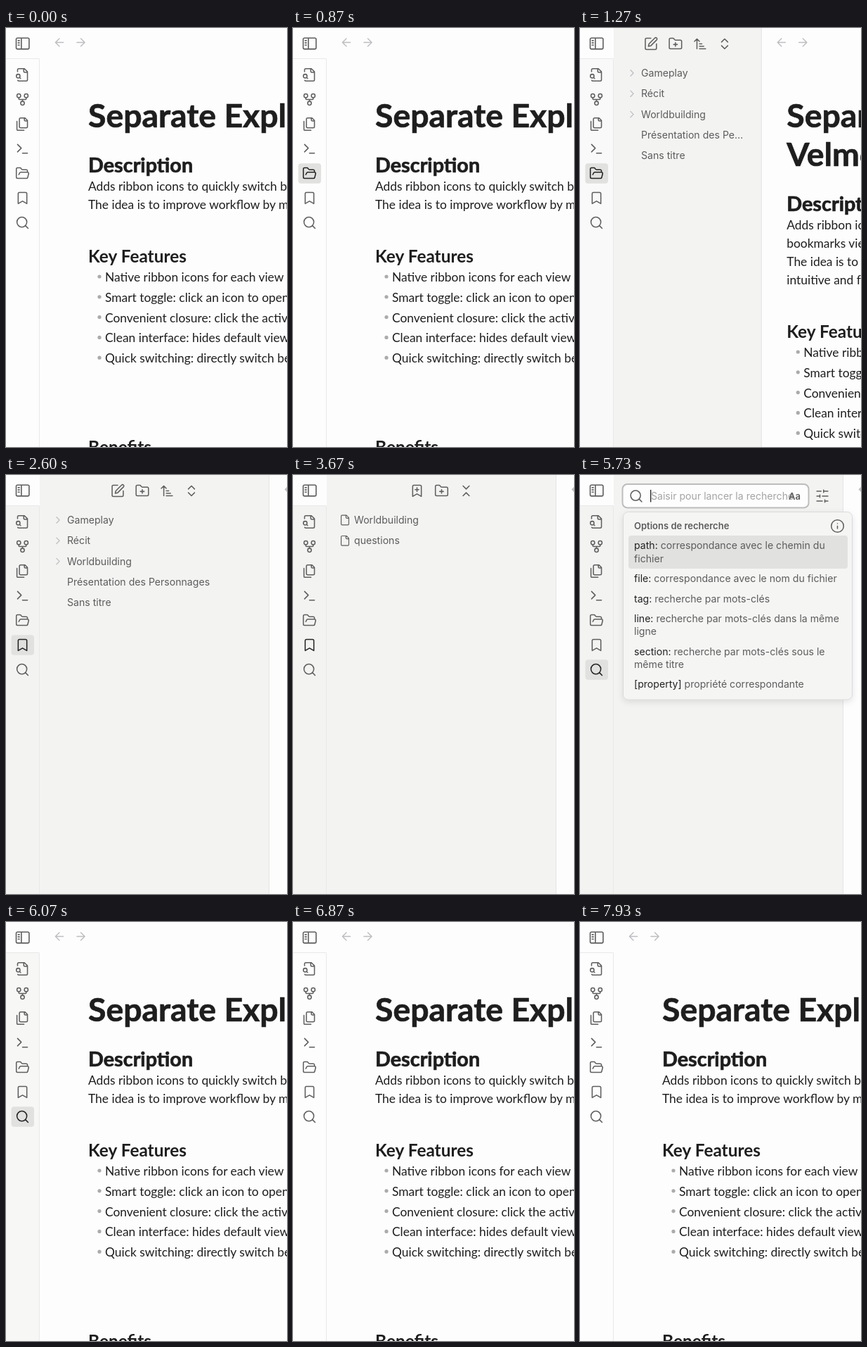
An HTML page that plays this animation: 400x595 px, repeating every 8 s.

```html
<!DOCTYPE html>
<html lang="fr">
<head>
<meta charset="utf-8">
<title>Sidebar ribbon</title>
<style>
  html, body { margin: 0; width: 100%; height: 100%; overflow: hidden; background: #fdfdfd; }
  svg { display: block; width: 100vw; height: 100vh; }
  text { white-space: pre; }
  .doc { font-family: Lato, sans-serif; fill: #1e1e1e; }
  .ui { font-family: Inter, sans-serif; font-size: 14.1px; fill: #5c5c5c; }
  .key { fill: #222; }
  .bold { font-weight: 700; }
  .heavy { stroke: #1e1e1e; stroke-width: 0.7; }
  .semi { font-weight: 600; font-size: 13px; }
  .icon { fill: none; stroke: #5f5f5f; stroke-width: 1.75; stroke-linecap: round; stroke-linejoin: round; }
  .faint { stroke: #bebec2; }
</style>
</head>
<body>
<svg id="stage" viewBox="0 0 400 595"></svg>
<script>
const LOOP = 8000, STEP = 1000 / 15;
const RIBBON = 48, OPEN = 375;
const PAGE = '#fdfdfd', PANEL = '#f3f3f2', ACTIVE = '#e1e1e0', LINE = '#e4e4e4';

const circle = (x, y, r) => `M${x - r} ${y}a${r} ${r} 0 1 0 ${2 * r} 0a${r} ${r} 0 1 0 ${-2 * r} 0`;
const bookmark = 'M19 21l-7-4-7 4V5a2 2 0 0 1 2-2h10a2 2 0 0 1 2 2z';
const icons = {
  sidebar: 'M4 3.5h16a2 2 0 0 1 2 2v13a2 2 0 0 1-2 2H4a2 2 0 0 1-2-2v-13a2 2 0 0 1 2-2zM10 3.5v17M5 7.5h2M5 11h2M5 14.5h2',
  fileSearch: 'M14 2v4a2 2 0 0 0 2 2h4M4.3 21a2 2 0 0 0 1.7 1H18a2 2 0 0 0 2-2V7l-5-5H6a2 2 0 0 0-2 2v3M9 18l-1.5-1.5' + circle(5, 14, 3),
  fork: circle(12, 18, 3) + circle(6, 6, 3) + circle(18, 6, 3) + 'M18 9v2q0 1-1 1H7q-1 0-1-1V9M12 12v3',
  files: 'M20 7h-3a2 2 0 0 1-2-2V2M9 18a2 2 0 0 1-2-2V4a2 2 0 0 1 2-2h7l4 4v10a2 2 0 0 1-2 2zM3 7.6v12.8A1.6 1.6 0 0 0 4.6 22h9.8',
  terminal: 'M4 17l6-6-6-6M12 19h8',
  folder: 'M6 14l1.5-2.9A2 2 0 0 1 9.2 10H20a2 2 0 0 1 1.9 2.5l-1.5 6a2 2 0 0 1-2 1.5H4a2 2 0 0 1-2-2V5a2 2 0 0 1 2-2h3.9a2 2 0 0 1 1.7.9l.8 1.2a2 2 0 0 0 1.7.9H18a2 2 0 0 1 2 2v2',
  bookmark,
  search: circle(11, 11, 8) + 'M21 21l-4.3-4.3',
  edit: 'M12 3H5a2 2 0 0 0-2 2v14a2 2 0 0 0 2 2h14a2 2 0 0 0 2-2v-7M18.4 2.6a2.1 2.1 0 0 1 3 3l-9.4 9.4-4 1 1-4z',
  folderPlus: 'M12 10v6M9 13h6M20 20a2 2 0 0 0 2-2V8a2 2 0 0 0-2-2h-7.9a2 2 0 0 1-1.7-.9l-.8-1.2A2 2 0 0 0 7.9 3H4a2 2 0 0 0-2 2v13a2 2 0 0 0 2 2z',
  sort: 'M3 8l4-4 4 4M7 4v16M11 12h4M11 16h7M11 20h10',
  expand: 'M7 15l5 5 5-5M7 9l5-5 5 5',
  collapse: 'M7 20l5-5 5 5M7 4l5 5 5-5',
  bookmarkPlus: bookmark + 'M12 7v6M15 10H9',
  file: 'M15 2H6a2 2 0 0 0-2 2v16a2 2 0 0 0 2 2h12a2 2 0 0 0 2-2V7zM14 2v4a2 2 0 0 0 2 2h4',
  chevron: 'M9 18l6-6-6-6',
  sliders: 'M21 4h-7M10 4H3M21 12h-9M8 12H3M21 20h-5M12 20H3M14 2v4M8 10v4M16 18v4',
  info: circle(12, 12, 10) + 'M12 16v-4M12 8h0',
  back: 'M12 19l-7-7 7-7M19 12H5',
  forward: 'M12 5l7 7-7 7M5 12h14'
};

const icon = (name, x, y, size = 0.88, cls = '') =>
  `<path class="icon ${cls}" d="${icons[name]}" transform="translate(${x} ${y}) scale(${size}) translate(-12 -12)"/>`;
const text = (x, y, s, cls = 'ui', size) =>
  `<text class="${cls}" x="${x}" y="${y}"${size ? ` style="font-size:${size}px"` : ''}>${s}</text>`;
const body = (y, s, x = 0) => text(x, y, s, 'doc', 17.4);
const heading = (y, s, size, cls = '') => text(0, y, s, 'doc bold ' + cls, size);
const title = (y, s) => heading(y, s, 46.4, 'heavy');
const section = y => heading(y, 'Description', 28.8, 'heavy');
const toolbar = names => names.map((n, i) => icon(n, (i - (names.length - 1) / 2) * 35, 22.5)).join('');
const rowY = i => 69 + i * 29.3;

const ribbonIcons = ['fileSearch', 'fork', 'files', 'terminal', 'folder', 'bookmark', 'search'];
const ribbonY = i => 66.5 + i * 35;

const features = [
  'Native ribbon icons for each view',
  'Smart toggle: click an icon to open it',
  'Convenient closure: click the active icon',
  'Clean interface: hides default view tabs',
  'Quick switching: directly switch between'
].map((s, i) => {
  const y = 360 + i * 28.8;
  return `<circle cx="16" cy="${y - 7}" r="2.6" fill="#ababab"/>` + body(y, s, 24);
}).join('');

// Same document, laid out for a wide or a narrow column.
const wideText = title(141, 'Separate Explorer for Velmorra') + section(205) +
  body(231, 'Adds ribbon icons to quickly switch between') +
  body(257, 'The idea is to improve workflow by making');
const narrowText = title(141, 'Separate Explorer for') + title(196, 'Velmorra') + section(260) +
  ['Adds ribbon icons to quickly switch', 'bookmarks views', 'The idea is to improve workflow', 'intuitive and faster']
    .map((s, i) => body(286 + i * 26, s)).join('');

const treeRows = ['Gameplay', 'Récit', 'Worldbuilding', 'Présentation des Personnages', 'Sans titre'];
const option = (y, key, s, more) =>
  text(77, y, `<tspan class="key">${key}</tspan> ${s}`) + (more ? text(77, y + 18.7, more) : '');

const stage = document.getElementById('stage');
stage.innerHTML = `
<defs>
  <clipPath id="panelClip"><rect id="clipRect" x="48" width="0" height="595"/></clipPath>
  <clipPath id="inputClip"><rect x="90" y="14" width="213" height="32"/></clipPath>
  <filter id="shadow" x="-10%" y="-10%" width="120%" height="125%">
    <feDropShadow dx="0" dy="3" stdDeviation="4" flood-color="#000" flood-opacity=".1"/>
  </filter>
</defs>
<rect width="400" height="595" fill="${PAGE}"/>
<g id="nav">${icon('back', 28, 20.5, 0.8, 'faint')}${icon('forward', 58.5, 20.5, 0.8, 'faint')}</g>
<g id="page">
  <g id="wide">${wideText}</g><g id="narrow">${narrowText}</g>
  <g id="rest">${heading(333, 'Key Features', 24.4)}${features}${heading(604, 'Benefits', 24.4)}</g>
</g>
<g clip-path="url(#panelClip)">
  <rect x="48" width="352" height="595" fill="${PANEL}"/>
  <g id="explorer">
    <g class="centred">${toolbar(['edit', 'folderPlus', 'sort', 'expand'])}</g>
    ${treeRows.map((s, i) => text(87, rowY(i), s) + (i < 3 ? icon('chevron', 74, rowY(i) - 5, 0.7, 'faint') : '')).join('')}
  </g>
  <g id="bookmarks">
    <g class="centred">${toolbar(['bookmarkPlus', 'folderPlus', 'collapse'])}</g>
    ${['Worldbuilding', 'questions'].map((s, i) => text(87, rowY(i), s) + icon('file', 74, rowY(i) - 5, 0.68)).join('')}
  </g>
  <g id="find">
    <rect x="60.5" y="13" width="265" height="33.5" rx="7" fill="${PAGE}" stroke="#bdbdbd" stroke-width="2"/>
    ${icon('search', 80, 30)}
    <g clip-path="url(#inputClip)" opacity=".55">${text(101, 35, 'Saisir pour lancer la recherche...')}</g>
    <text class="ui semi" x="297" y="35">Aa</text>
    ${icon('sliders', 345, 30)}
    <rect id="caret" x="100" y="21" width="1.3" height="17.5" fill="#222"/>
  </g>
</g>
<path id="edge" d="M0 0V595" stroke="${LINE}"/>
<rect width="48" height="595" fill="${PAGE}"/>
<rect id="ribbonFill" y="44" width="48" height="551" fill="${PANEL}"/>
<path d="M0 43.5H47.5M47.5 44V595" fill="none" stroke="#e9e9e9"/>
${icon('sidebar', 23.7, 22, 0.92)}
${ribbonIcons.map((n, i) => `<g id="${n}"><rect x="7.5" y="${ribbonY(i) - 14.3}" width="32.5" height="28.5" rx="4" fill="${ACTIVE}" opacity="0"/>${icon(n, 23.5, ribbonY(i))}</g>`).join('')}
<g id="popup">
  <rect x="61.5" y="52.5" width="326" height="266.5" rx="7" fill="#f5f5f4" stroke="#dadada" filter="url(#shadow)"/>
  <rect x="69" y="86" width="312" height="47" rx="4" fill="${ACTIVE}"/>
  <text class="ui semi" x="77" y="76.7">Options de recherche</text>
  ${icon('info', 366.5, 72.5)}
  ${option(105.3, 'path:', 'correspondance avec le chemin du', 'fichier')}
  ${option(152, 'file:', 'correspondance avec le nom du fichier')}
  ${option(180.5, 'tag:', 'recherche par mots-clés')}
  ${option(208.7, 'line:', 'recherche par mots-clés dans la même', 'ligne')}
  ${option(255.5, 'section:', 'recherche par mots-clés sous le', 'même titre')}
  ${option(302, '[property]', 'propriété correspondante')}
</g>`;

const $ = id => document.getElementById(id);
const set = (id, attr, value) => $(id).setAttribute(attr, value);
const show = (id, on) => set(id, 'display', on ? 'inline' : 'none');
const ramp = (t, from, to) => Math.min(1, Math.max(0, (t - from) / (to - from)));
const smooth = p => p * p * (3 - 2 * p);

const longRow = [...document.querySelectorAll('#explorer text')].find(el => el.textContent === treeRows[3]);
function fitRow(limit) {
  let n = treeRows[3].length;
  longRow.textContent = treeRows[3];
  while (n > 1 && longRow.getComputedTextLength() > limit)
    longRow.textContent = treeRows[3].slice(0, --n) + '…';
}

// When the pointer enters and leaves each ribbon button.
const hovers = { folder: [730, 2260], bookmark: [2330, 3660], search: [3730, 6530] };

function render(time) {
  const t = Math.floor((time % LOOP) / STEP + 0.05) * STEP;
  const opened = smooth(ramp(t, 1183, 1323)) - smooth(ramp(t, 5905, 6045));
  const left = RIBBON + (OPEN - RIBBON) * opened;
  const narrow = left > 150;

  set('nav', 'transform', `translate(${left} 0)`);
  set('page', 'transform', `translate(${left + Math.max(35.5, 69 - (left - RIBBON) / 2)} 0)`);
  show('wide', !narrow);
  show('narrow', narrow);
  set('rest', 'transform', `translate(0 ${narrow ? 107 : 0})`);

  set('clipRect', 'width', left - RIBBON);
  set('edge', 'transform', `translate(${left - 0.5} 0)`);
  document.querySelectorAll('.centred').forEach(g =>
    g.setAttribute('transform', `translate(${(left + RIBBON) / 2} 0)`));
  show('explorer', t < 2660);
  show('bookmarks', t >= 2660 && t < 4190);
  show('find', t >= 4190);
  show('popup', t >= 4190 && t < 5920);
  set('caret', 'opacity', 1 - ramp(t, 4670, 4990) + ramp(t, 5470, 5730));
  if (t < 2660) fitRow(left - 24 - 87);
  set('ribbonFill', 'opacity', ramp(t, 1183, 1400) - ramp(t, 5905, 6320));

  for (const [name, [enter, leave]] of Object.entries(hovers)) {
    const [box, glyph] = $(name).children;
    const on = t >= enter && t < leave;
    box.setAttribute('opacity', on ? 1 : 0);
    // The glyph colour eases back after the box has gone.
    const shade = Math.round(95 - 60 * (ramp(t, enter, enter + 130) - ramp(t, leave, leave + 130)));
    glyph.style.stroke = `rgb(${shade},${shade},${shade})`;
  }
}

const start = performance.now();
function tick() {
  render(performance.now() - start);
  requestAnimationFrame(tick);
}
tick();
</script>
</body>
</html>
```
